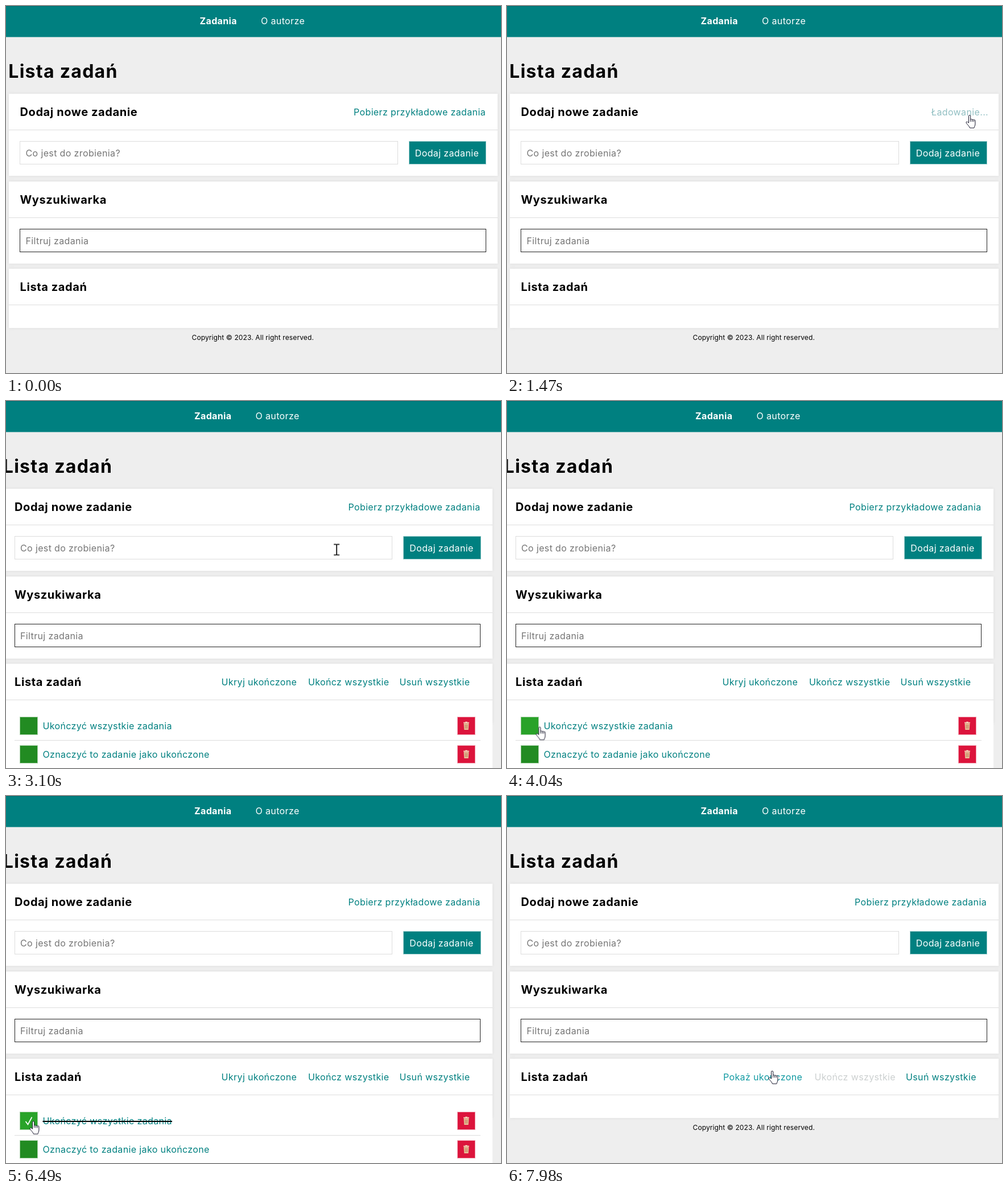
An HTML page for the animation above (8000 ms loop, 870x644 px).

```html
<!DOCTYPE html>
<html lang="pl">
<head>
<meta charset="utf-8">
<title>Lista zadań</title>
<style>
@property --done { syntax: "<number>"; inherits: true; initial-value: 0; }
:root { --teal: #008080; --lit: #129aa2; --off: #ccd0d0; --green: #228b22; --green-lit: #29a329; }
html, body { margin: 0; width: 100%; height: 100%; overflow: hidden; background: #eee; }
body {
  position: relative;
  font: 16px Inter, "Open Sans", sans-serif;
  font-optical-sizing: none;
  letter-spacing: .023em;
}
body * { box-sizing: border-box; position: absolute; }
header {
  left: 0; top: 0; width: 100%; height: 54px;
  background: var(--teal); border-top: 1px solid #006c70; box-shadow: 0 1px rgb(0 128 128 / .5);
}

/* every text is placed by its left edge and the middle of its line */
.t { margin: -20px 0 0; line-height: 40px; white-space: nowrap; font-weight: 400; }
b.t, h1, h2 { font-weight: 700 !important; }
nav .t { color: #fff; }
h1 { font-size: 32px; letter-spacing: .04em; }
h2 { font-size: 20px; letter-spacing: .03em; left: 24.5px; }
.link { color: var(--teal); }
.hint { color: #757575; }
footer.t { font-size: 12px; letter-spacing: .01em; }

.page { left: 0; top: 0; width: 870px; height: 644px; }
.card { left: 4.8px; width: 859.6px; background: #fff; box-shadow: 0 0 5px #ddd; }
.card i { left: 0; top: 63px; width: 100%; height: 1px; background: #ddd; }
.field { left: 24.2px; height: 41px; border: 1px solid #ddd; }
/* solid boxes have a soft rim */
.button, .check, .bin { box-shadow: 0 0 0 1px rgb(var(--rim) / .4); }
.button { --rim: 0 128 128; left: 708.8px; top: 238px; width: 134.4px; height: 39px; background: var(--teal); }
.button .t { left: 10px; top: 20px; color: #fff; }

.tasks { left: 4.8px; top: 540px; width: 859.6px; height: 120px; background: #fff; }
.task { left: 19.4px; width: 819.2px; height: 51px; border-bottom: 1px solid #ddd; }
.task .t { left: 49.8px; top: 25px; text-decoration: line-through 2px rgb(0 0 0 / var(--done)); }
.check, .bin { top: 10px; width: 30px; height: 30px; }
.check { --rim: 34 139 34; left: 10.3px; background: var(--green); }
.check svg { opacity: var(--done); }
.bin { --rim: 220 20 60; left: 779.3px; background: #dc143c; }
svg { left: 0; top: 0; overflow: visible; }

.cursor { left: 0; top: 0; width: 0; height: 0; }
.cursor svg { fill: #fff; stroke: #15152a; stroke-width: 1; stroke-linejoin: round; }

/* motion: one percent is 80 ms */
.page, .tasks, .links, .hide, .show, .load, .wait, .arrow, .hand, .beam { animation: 8s step-end infinite; }
.page { animation-name: shift; }
.tasks, .hide { animation-name: open; }
.links { animation-name: loaded; }
.show { animation-name: closed; }
.arrow { animation-name: arrow; }
.hand { animation-name: hand; }
.beam { animation-name: beam; }
.load { animation: idle 8s step-end infinite, load 8s infinite; }
.wait { animation: busy 8s step-end infinite, wait 8s infinite; }
.hide { animation: open 8s step-end infinite, hide 8s infinite; }
.finish { animation: finish 8s infinite; }
.one { animation: one 8s linear infinite; }
.two { animation: two 8s linear infinite; }
.one .check { animation: lit-one 8s infinite; }
.two .check { animation: lit-two 8s infinite; }
.cursor { animation: move 8s linear infinite; }

@keyframes shift { 0%, 97.5%, 100% { left: 0; } 32.25% { left: -9.5px; } }
@keyframes open { 0%, 97.5%, 100% { visibility: hidden; } 32.25% { visibility: visible; } }
@keyframes loaded { 0% { visibility: hidden; } 32.25%, 100% { visibility: visible; } }
@keyframes closed { 0% { visibility: hidden; } 97.5%, 100% { visibility: visible; } }
@keyframes idle { 0%, 32.25%, 100% { visibility: visible; } 15.875% { visibility: hidden; } }
@keyframes busy { 0%, 32.25%, 100% { visibility: hidden; } 15.875% { visibility: visible; } }

@keyframes load {
  0%, 8% { color: var(--teal); }
  14.25%, 15.875% { color: var(--lit); }
  16%, 32.25% { color: var(--off); }
  38.5%, 100% { color: var(--teal); }
}
@keyframes wait { 0%, 15.875% { color: var(--lit); } 22.125%, 100% { color: var(--off); } }
@keyframes hide { 0%, 95.375% { color: var(--teal); } 97.5%, 100% { color: var(--lit); } }
@keyframes finish { 0%, 90% { color: var(--teal); } 96.25%, 100% { color: var(--off); } }

@keyframes one {
  0%, 54.75%, 62.5%, 71.875% { --done: 0; }
  57.25%, 60%, 74.375%, 100% { --done: 1; }
}
@keyframes two { 0%, 89.875% { --done: 0; } 91.375%, 100% { --done: 1; } }
@keyframes lit-one {
  0%, 48.75%, 85.75%, 100% { background: var(--green); }
  51.25%, 82% { background: var(--green-lit); }
}
@keyframes lit-two {
  0%, 83.125%, 94.75%, 100% { background: var(--green); }
  86.25%, 91.2% { background: var(--green-lit); }
}

@keyframes move {
  0%, .87% { transform: translate(900px, 700px); }
  .875% { transform: translate(809px, 628px); }
  1.625% { transform: translate(856px, 440px); }
  2.375% { transform: translate(880px, 380px); }
  4.87% { transform: translate(880px, 130px); }
  4.875% { transform: translate(866px, 139px); }
  6.625% { transform: translate(838px, 170px); animation-timing-function: ease-out; }
  8.75%, 25.875% { transform: translate(812px, 191px); }
  30.875%, 32.25% { transform: translate(802px, 208px); animation-timing-function: ease-in; }
  35.25% { transform: translate(740px, 226px); }
  38.75% { transform: translate(582px, 260px); }
  45.5%, 46.25% { transform: translate(79px, 575px); }
  52.25%, 81.125% { transform: translate(47px, 570px); }
  85.625%, 89.875% { transform: translate(44px, 620px); }
  90.5% { transform: translate(50px, 617px); }
  91.375% { transform: translate(72px, 608px); animation-timing-function: ease-out; }
  96.25%, 100% { transform: translate(465px, 482px); }
}
@keyframes arrow {
  0%, 27.5%, 39.1%, 42.4%, 91.7% { visibility: visible; }
  7.75%, 36.6%, 41.6%, 44.9%, 95.6%, 100% { visibility: hidden; }
}
@keyframes hand {
  0%, 27.5%, 91.7% { visibility: hidden; }
  7.75%, 44.9%, 95.6%, 100% { visibility: visible; }
}
@keyframes beam {
  0%, 39.1%, 42.4%, 100% { visibility: hidden; }
  36.6%, 41.6% { visibility: visible; }
}
</style>
</head>
<body>
<header></header>
<div class="page">
  <nav>
    <b class="t" style="left:340.5px;top:25.5px">Zadania</b>
    <span class="t" style="left:448px;top:25.5px">O autorze</span>
  </nav>
  <h1 class="t" style="left:4.3px;top:115px">Lista zadań</h1>

  <div class="card" style="top:154px;height:143.5px"><i></i></div>
  <h2 class="t" style="top:185.5px">Dodaj nowe zadanie</h2>
  <span class="t link load" style="left:611px;top:185.5px">Pobierz przykładowe zadania</span>
  <span class="t wait" style="left:745.5px;top:185.5px">Ładowanie...</span>
  <div class="field" style="top:237px;width:664.6px"></div>
  <span class="t hint" style="left:34.5px;top:258px">Co jest do zrobienia?</span>
  <div class="button"><span class="t">Dodaj zadanie</span></div>

  <div class="card" style="top:308px;height:143.5px"><i></i></div>
  <h2 class="t" style="top:339.5px">Wyszukiwarka</h2>
  <div class="field" style="top:391px;width:819.4px;border-color:#222"></div>
  <span class="t hint" style="left:34.5px;top:411.5px">Filtruj zadania</span>

  <div class="card" style="top:461px;height:104px"><i></i></div>
  <h2 class="t" style="top:493px">Lista zadań</h2>
  <span class="t link hide" style="left:388px;top:493px">Ukryj ukończone</span>
  <span class="t show" style="left:380px;top:493px;color:var(--lit)">Pokaż ukończone</span>
  <div class="links">
    <span class="t link finish" style="left:540.5px;top:493px">Ukończ wszystkie</span>
    <span class="t link" style="left:701px;top:493px">Usuń wszystkie</span>
  </div>
  <footer class="t" style="left:326.5px;top:582px">Copyright © 2023. All right reserved.</footer>

  <div class="tasks">
    <div class="task one" style="top:5px">
      <div class="check"><svg width="30" height="30"><path id="tick" d="M9.500 16l4 5.500L20.500 8.500" fill="none" stroke="#fff" stroke-width="1.7"/></svg></div>
      <span class="t link">Ukończyć wszystkie zadania</span>
      <div class="bin"><svg width="30" height="30"><g id="bin"><path d="M10.500 10.500h9l-.8 11.500h-7.400z" fill="#e9c39a"/><path d="M10 9.500h10M13.200 8.500h3.600" stroke="#f6dfc0" stroke-width="1.500"/><path d="M13 12.500v7.500M15 12.500v7.500M17 12.500v7.500" stroke="#b5654a" stroke-width=".8"/></g></svg></div>
    </div>
    <div class="task two" style="top:55px">
      <div class="check"><svg width="30" height="30"><use href="#tick"/></svg></div>
      <span class="t link">Oznaczyć to zadanie jako ukończone</span>
      <div class="bin"><svg width="30" height="30"><use href="#bin"/></svg></div>
    </div>
  </div>
</div>

<div class="cursor">
  <svg class="arrow" width="14" height="21"><path d="M.5.5V17.500L4.300 13.900 6.900 19.800 9.300 18.700 6.800 13H12.500Z"/></svg>
  <svg class="hand" width="18" height="24" style="left:-6px"><path d="M5.500 14V2.200a1.600 1.600 0 0 1 3.200 0V8.500a1.500 1.500 0 0 1 2.900.4 1.400 1.400 0 0 1 2.700.5 1.400 1.400 0 0 1 2.600.6V16c0 3-1.500 4.500-2 7H7.500C7 20.500 3 17 1.200 14.200.3 12.500 2.200 11.300 3.500 12.500Z"/><path d="M8.700 8.500v3.500M11.600 9v3.200M14.300 9.500v2.800" fill="none"/></svg>
  <svg class="beam" width="1" height="1"><path d="M-5-9h4l1 1 1-1h4M0-8V8.500M-5 9.500h4l1-1 1 1h4" style="fill:none;stroke:#000;stroke-width:1.700"/></svg>
</div>
</body>
</html>
```
